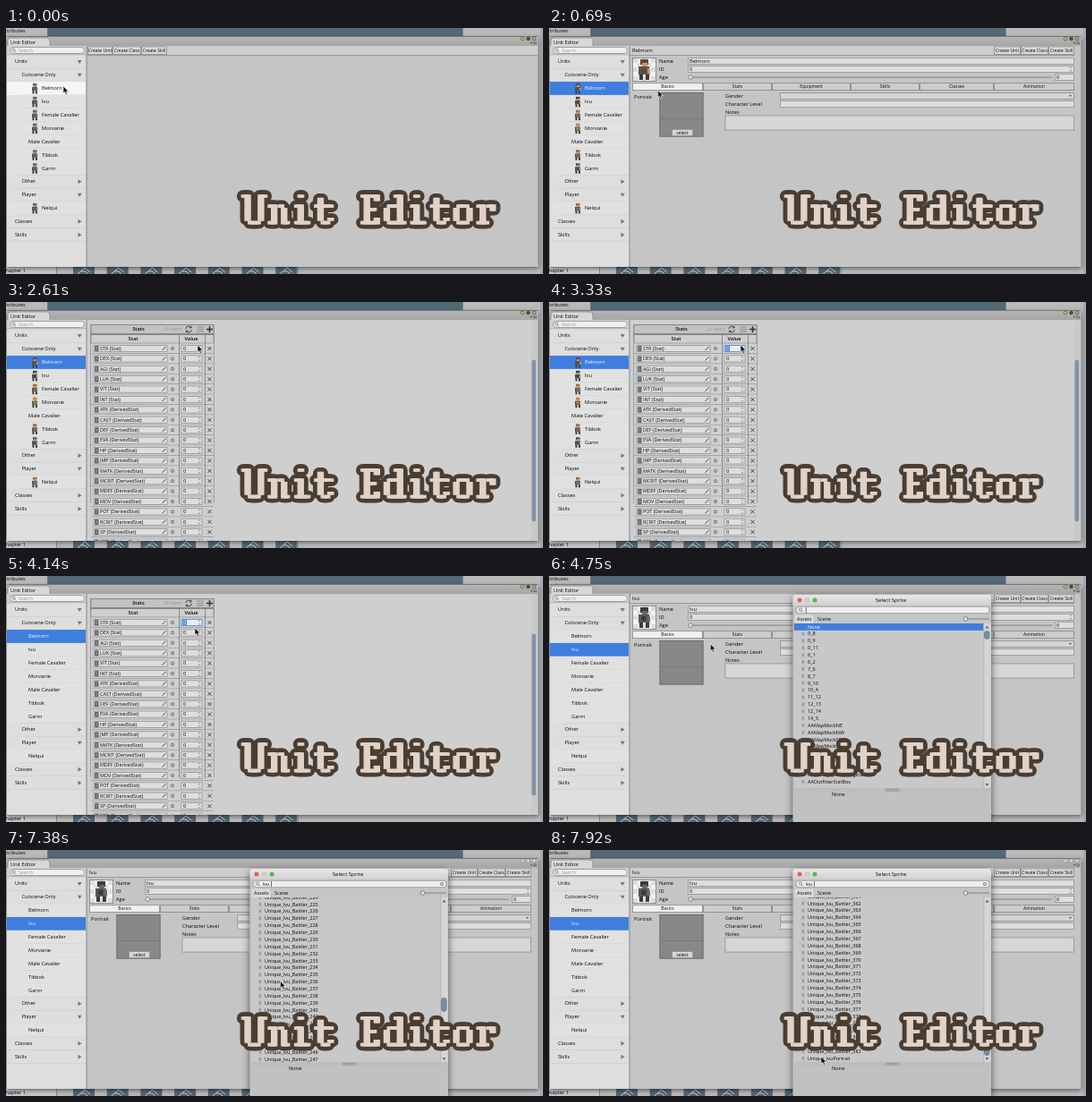
Animation of 600 by 275 pixels, one loop 8 s. Source, as an HTML page with a canvas:

```html
<!DOCTYPE html>
<html lang="en">
<head>
<meta charset="utf-8">
<title>Unit Editor</title>
<style>
  html, body { margin: 0; width: 100%; height: 100%; overflow: hidden; background: #b9b9b9; }
  canvas { display: block; width: 600px; height: 275px; }
</style>
</head>
<body>
<canvas id="stage" width="600" height="275"></canvas>
<script>
const ctx = document.getElementById('stage').getContext('2d');
const LOOP = 8000;
const FONT = '"Open Sans", "Lato", sans-serif';
const BLUE = '#3f7ede';
const INK = '#080808';
const ROW = 7.87;

// Bursts of steps: start, end, number of steps.
const bursts = [
  [0, 0, 1], [180, 860, 8], [1130, 1400, 4], [1580, 1980, 5], [2400, 2790, 5],
  [3060, 3330, 4], [3510, 3960, 6], [4140, 4840, 9], [4960, 4960, 1], [5140, 5140, 1],
  [5770, 5770, 1], [6670, 6670, 1], [7020, 7020, 1], [7200, 7920, 9]
];

const cursorKeys = [
  [0, 64, 65], [270, 64, 65], [860, 150, 72], [1130, 160, 71], [1400, 191, 65],
  [1980, 200, 72], [2400, 203, 70], [2595, 214, 48], [3330, 214, 48], [3510, 200, 51],
  [3960, 211, 58], [4140, 211, 58], [4315, 46, 80], [4400, 46, 80], [4577, 148, 116],
  [4665, 150, 114], [4752, 180, 76], [4960, 309, 37], [6670, 309, 37], [7020, 308, 90],
  [7920, 304, 231]
];

const units = [
  ['Units', 0, 'open'], ['Cutscene Only', 1, 'open'], ['Belmorn', 2, '#5b4a3c'], ['Ivu', 2, '#3c4046'],
  ['Female Cavalier', 2, '#a8653a'], ['Morvanie', 2, '#b98a50'], ['Male Cavalier', 2], ['Tibbok', 2, '#8a6a50'],
  ['Garrn', 2, '#4b4e55'], ['Other', 1, 'shut'], ['Player', 1, 'open'], ['Nelqui', 2, '#9a7048'],
  ['Classes', 0, 'shut'], ['Skills', 0, 'shut']
];
const stats = 'STR DEX AGI LUK VIT INT ATK CAST DEF EVA HP JMP MATK MCRIT MDEF MOV POT RCRIT SP SPD'.split(' ');
const sprites = ('None 0_8 0_9 0_11 6_1 6_2 7_6 8_7 9_10 10_4 11_12 12_13 12_14 14_5 AAMapMockNE AAMapMockNW ' +
  'AAMapMockSE AAMapMockSW AAMapMock AABoardStand AAMoneySymbol AAMoneySymbolOriginal AAOutfitterStatBox').split(' ');
const matches = ['None', 'Unique_Ivu_Ani1'];
for (let i = 0; i < 64; i++) matches.push('Unique_Ivu_Ani1_' + i);
for (let i = 0; i < 384; i++) matches.push('Unique_Ivu_Battler_' + i);
matches.push('Unique_IvuPortrait');

const clamp = v => Math.max(0, Math.min(1, v));
const ease = (t, from, to) => 1 - (1 - clamp((t - from) / (to - from))) ** 2;

function held(t) {
  const [from, to, n] = bursts.findLast(b => b[0] <= t);
  if (n === 1) return from;
  const gap = (to - from) / (n - 1);
  return from + gap * Math.min(n - 1, Math.floor((t - from + 8) / gap));
}

function cursorAt(t) {
  const next = cursorKeys.findIndex(k => k[0] > t);
  if (next < 0) return cursorKeys.at(-1).slice(1);
  const a = cursorKeys[next - 1], b = cursorKeys[next];
  const p = (t - a[0]) / (b[0] - a[0]);
  return [a[1] + (b[1] - a[1]) * p, a[2] + (b[2] - a[2]) * p];
}

function rect(x, y, w, h, fill, line) {
  if (fill) { ctx.fillStyle = fill; ctx.fillRect(x, y, w, h); }
  if (line) {
    ctx.strokeStyle = line;
    ctx.lineWidth = 0.8;
    ctx.strokeRect(x + 0.4, y + 0.4, w - 0.8, h - 0.8);
  }
}

function pill(x, y, w, h, r, fill, line) {
  ctx.beginPath();
  ctx.roundRect(x, y, w, h, r);
  ctx.fillStyle = fill;
  ctx.fill();
  if (line) { ctx.strokeStyle = line; ctx.lineWidth = 0.7; ctx.stroke(); }
}

function dot(x, y, r, fill, line) { pill(x - r, y - r, 2 * r, 2 * r, r, fill, line); }

function text(s, x, y, { size = 5.7, color = INK, align = 'left', weight = 500 } = {}) {
  ctx.font = `${weight} ${size}px ${FONT}`;
  ctx.fillStyle = color;
  ctx.textAlign = align;
  ctx.textBaseline = 'middle';
  ctx.fillText(s, x, y + 0.3);
}

function path(d, color, width = 0.8, fill) {
  const p = new Path2D(d);
  if (fill) { ctx.fillStyle = fill; ctx.fill(p); }
  if (color) { ctx.strokeStyle = color; ctx.lineWidth = width; ctx.stroke(p); }
}

function at(x, y, scale, draw) {
  ctx.save();
  ctx.translate(x, y);
  ctx.scale(scale, scale);
  draw();
  ctx.restore();
}

function clipped(x, y, w, h, draw) {
  ctx.save();
  ctx.beginPath();
  ctx.rect(x, y, w, h);
  ctx.clip();
  draw();
  ctx.restore();
}

function gradient(y, h, top, bottom) {
  const g = ctx.createLinearGradient(0, y, 0, y + h);
  g.addColorStop(0, top);
  g.addColorStop(1, bottom);
  return g;
}

function button(label, x, y, w, h, fill = '#d9d9d9', size = 5) {
  rect(x, y, w, h, fill, '#858585');
  text(label, x + w / 2, y + h / 2, { size, align: 'center' });
}

function figure(x, y, scale, tint, skin = '#c99873') {
  at(x, y, scale, () => {
    rect(-2, -6, 4.5, 3, tint);
    rect(-1, -4, 3, 2, skin);
    rect(-3, -2, 6, 4.5, '#55565a');
    rect(-1.5, -1, 2.5, 2.5, tint);
    rect(2, -1, 1.5, 3, skin);
    rect(-2.5, 2.5, 2, 3, '#3d3a38');
    rect(1, 2.5, 2, 3, '#3d3a38');
  });
}

function magnifier(x, y) {
  ctx.beginPath();
  ctx.arc(x, y, 1.6, 0, 7);
  ctx.moveTo(x + 1.2, y + 1.2);
  ctx.lineTo(x + 2.8, y + 2.8);
  ctx.strokeStyle = '#666';
  ctx.lineWidth = 0.7;
  ctx.stroke();
}

function drawBackdrop() {
  rect(0, 0, 600, 275, '#b9b9b9');
  rect(47, 0, 463, 9, '#536977');
  rect(46, 0, 1, 9, '#777');
  rect(510, 0, 1, 9, '#888');
  text('ttributes', -1, 3);
  rect(0, 267, 56, 8, '#c6c6c6');
  rect(56, 267, 1, 8, '#888');
  text('hapter 1', -0.5, 271.5);
  for (let i = 0; i < 7; i++) {
    const x = 75 + i * 37.7;
    rect(x, 266, 24, 9, '#526674');
    path(`M${x + 5} 275l8-7l6 5M${x + 9} 272q5 -1 7 3`, '#d2d8da', 1);
  }
  rect(326, 267, 1, 8, '#8e8e8e');
  rect(597, 0, 3, 275, '#a2a8ac');
}

function drawWindow(mainColor, focused) {
  ctx.save();
  ctx.shadowColor = '#0008';
  ctx.shadowBlur = 5;
  ctx.shadowOffsetY = 1.5;
  rect(1, 9, 593.5, 258, mainColor);
  ctx.restore();
  rect(1, 9, 593.5, 11, gradient(9, 11, '#b6b6b6', '#a5a5a5'));
  rect(1, 9, 593.5, 1, '#777');
  pill(2, 11, 47, 10, [3, 3, 0, 0], '#d8d8d8', '#808080');
  text('Unit Editor', 5, 16);
  ['#d8b849', '#494949', '#c8a556'].forEach((color, i) =>
    dot(577 + i * 6.5, 12, 2, focused ? color : '#dedede', focused ? '#555' : '#888'));
  path('M586 16h2l-1 1.5zM589 16h4M589 17.5h4', '#444', 0.6);
}

function drawSidebar(t, selected, icons) {
  rect(1, 20, 89, 10, '#d2d2d2');
  pill(4.5, 21.5, 83, 7, 3.5, '#efefef', '#858585');
  magnifier(8.5, 24.5);
  text('Search', 14, 25, { size: 5, color: '#999' });
  rect(1, 30, 89, 237, '#dedede');
  rect(1, 29.5, 89, 0.7, '#a5a5a5');
  units.forEach(([label, depth, mark], i) => {
    const y = 37.7 + i * 14.88;
    const chosen = label === selected;
    if (depth === 2) rect(1, y - 7.4, 88, 14.9, '#e1e1e1');
    if (chosen) rect(1, y - 7.4, 88, 14.9, BLUE);
    else if (!selected && i === 2) rect(1, y - 7.4, 88, 14.9, '#f5f5f5');
    if (!chosen) rect(1 + depth * 7, y + 7.2, 88 - depth * 7, 0.6, '#cbcbcb');
    const hasIcon = icons && depth === 2 && mark;
    if (hasIcon) figure(32, y + 0.5, 1, t < 180 ? '#66615b' : mark, t < 180 ? '#948a80' : undefined);
    text(label, hasIcon ? 40 : [10, 17.5, 25][depth], y, { color: chosen ? '#f5f8ff' : INK });
    if (mark === 'open') path(`M79.7 ${y - 1.8}h5l-2.5 4z`, null, 0, '#777');
    if (mark === 'shut') path(`M80.5 ${y - 2.4}v5l4-2.5z`, null, 0, '#777');
  });
  rect(89.5, 20, 1, 247, '#858585');
}

function drawHeader(name, tab) {
  rect(91, 20, 496, 10.5, '#cdcdcd');
  rect(91, 30, 496, 0.8, '#8d8d8d');
  text(name, 93, 25.3);
  button('Create Unit', 497, 20.5, 30, 9.5);
  button('Create Class', 527, 20.5, 31, 9.5);
  button('Create Skill', 558, 20.5, 29, 9.5);

  rect(93, 33, 27, 27, '#f4f4f4', '#777');
  for (let i = 0; i < 25; i += 2) rect(94 + i % 5 * 5, 34 + Math.floor(i / 5) * 5, 5, 5, '#dcdcdc');
  if (name === 'Ivu') figure(106, 47, 2, '#393a3c', '#6f675c');
  else figure(106, 47, 2, '#6a4632');

  ['Name', 'ID', 'Age'].forEach((label, i) => text(label, 123, 37.2 + i * 9));
  rect(155, 33.3, 432, 7.6, '#dedede', '#929292');
  rect(155, 42.2, 432, 7.6, '#dedede', '#929292');
  text(name, 157, 37.2);
  text('0', 157, 46.2);
  path('M582 45l1-1.5l1 1.5M582 47l1 1.5l1-1.5', '#777', 0.6);
  rect(156, 54.6, 406, 1, '#818181');
  dot(158.2, 55, 2.3, '#e5e5e5', '#666');
  rect(565, 51.2, 22, 7.6, '#dedede', '#929292');
  text('0', 567, 55.2);

  const edges = [93, 172, 249, 337, 414, 497, 587];
  ['Basics', 'Stats', 'Equipment', 'Skills', 'Classes', 'Animation'].forEach((label, i) =>
    button(label, edges[i], 61.3, edges[i + 1] - edges[i], 8.7, label === tab ? '#f0f0f0' : '#cdcdcd'));
}

function drawBasics(ready) {
  text('Portrait', 95, 77);
  rect(123.5, 72, 49, 49.5, '#888', '#666');
  rect(124.5, 101, 47, 0.8, '#757575');
  if (ready) button('select', 137, 113, 24, 8, '#d6d6d6');
  ['Gender', 'Character Level', 'Notes'].forEach((label, i) => text(label, 197, 76.3 + i * 8.8));
  rect(258, 72.3, 329, 7.6, '#d4d4d4', '#8d8d8d');
  path('M581 75h3l-1.5 2z', null, 0, '#555');
  rect(258, 81.2, 329, 7.6, '#dedede', '#929292');
  rect(196.5, 97.5, 390.5, 17, '#d6d6d6', '#8d8d8d');
}

function drawStats(filled, editing) {
  const bold = { align: 'center', weight: 600, size: 5.7 };
  rect(94.5, 77, 138, 200, '#c9c9c9', '#777');
  rect(94.5, 77, 138, 11, '#c3c3c3', '#777');
  text('Stats', 148, 82.6, bold);
  text('26 items', 176, 82.6, { size: 5.2, color: '#969696' });
  path('M201 82a3.2 3.2 0 0 1 6 -1.2v-2M207 80.8h-2M207.4 83a3.2 3.2 0 0 1 -6 1.2v2M201.4 84.2h2', '#333', 0.9);
  path('M213 80h8M213 82.5h8M213 85h8', '#8b8b8b', 1);
  path('M224 82.5h7M227.5 79v7', '#333', 1.5);
  rect(94.5, 88, 138, 10.5, '#cfcfcf', '#777');
  text('Stat', 142, 93.3, bold);
  text('Value', 207, 93.3, bold);
  stats.forEach((stat, i) => {
    const y = 98.4 + i * 11.4, mid = y + 5.6;
    rect(95, y, 137, 11.4, '#cfcfcf');
    rect(95, y + 10.8, 137, 0.8, '#8d8d8d');
    path(`M225.5 ${mid - 2}l4 4m0 -4l-4 4`, '#333', 0.9);
    if (!filled) return;
    rect(97.5, y + 1.6, 83, 8, '#dedede', '#929292');
    rect(99.3, mid - 2.7, 4, 5.6, '#788692', '#4d5960');
    text(stat + (i < 6 ? ' (Stat)' : ' (DerivedStat)'), 105, mid, { size: 5.4 });
    path(`M174.5 ${mid + 2}l4-4`, '#333', 0.9);
    dot(186, mid, 1.5, '#ddd', '#333');
    rect(195.5, y + 1.6, 24, 8, '#dedede', '#929292');
    const active = editing && i === 0;
    if (active) {
      rect(195.5, y + 1.6, 24, 8, '#e8eef8', '#4c7fd0');
      rect(197, y + 2.8, 5, 5.6, BLUE);
    }
    text('0', 198, mid, { color: active ? '#fff' : INK });
    path(`M215 ${mid - 1}l1-1.5l1 1.5M215 ${mid + 1}l1 1.5l1-1.5`, '#777', 0.6);
  });
  for (const x of [193, 222]) rect(x, 88, 0.8, 190, '#777');
}

function drawDialog(t) {
  const query = t < 5140 ? '' : t < 5770 ? 'i' : 'ivu ';
  const list = t < 5770 ? sprites : matches;
  const progress = ease(t, 7020, 7850);
  const offset = progress * Math.max(0, list.length * ROW - 184);

  ctx.save();
  ctx.shadowColor = '#0009';
  ctx.shadowBlur = 9;
  ctx.shadowOffsetY = 3;
  pill(272.5, 21, 221.5, 270, 3, '#c5c5c5');
  ctx.restore();
  pill(272.5, 21, 221.5, 12, [3, 3, 0, 0], gradient(21, 12, '#e8e8e8', '#d0d0d0'));
  dot(280, 27, 2.5, '#e45f55');
  dot(288.5, 27, 2.5, '#d2d2d0', '#bbb');
  dot(297, 27, 2.5, '#58b64e');
  text('Select Sprite', 382, 27.2, { size: 6, align: 'center' });

  pill(276, 34.2, 216, 7.5, 3.7, '#eee', '#888');
  magnifier(281, 37.5);
  text(query, 286.5, 38);
  rect(286.8 + ctx.measureText(query).width, 35, 0.7, 6, '#333');
  if (query) { dot(487, 38, 2.1, '#8a8a8a'); path('M486 37l2 2m0 -2l-2 2', '#eee', 0.6); }

  pill(274.5, 43.5, 21, 10, 1, '#d9d9d9');
  text('Assets', 277, 48.3, { size: 5.5 });
  text('Scene', 300, 48.3, { size: 5.5 });
  rect(463, 47.5, 29, 1, '#818181');
  dot(465.5, 48, 2.3, '#e5e5e5', '#666');

  rect(273.5, 53, 220, 184, '#c8c8c8');
  clipped(273.5, 53, 220, 184, () => {
    list.forEach((name, i) => {
      const y = 56.9 + i * ROW - offset;
      if (y < 45 || y > 245) return;
      if (i === 0) rect(273.5, y - ROW / 2, 212, ROW, BLUE);
      else {
        rect(282, y - 2.5, 4, 5, '#b4bcc1');
        rect(283, y - 1.5, 1.4, 2.5, '#7b8b97');
      }
      text(name, 289, y, { size: 5.45, color: i ? INK : '#f5f8ff' });
    });
  });
  rect(485.5, 53, 8, 184, '#d5d5d5');
  rect(485.5, 53, 0.7, 184, '#a5a5a5');
  const thumb = t < 5770 ? 9 : 15;
  pill(486.5, 61.5 + progress * (168 - thumb), 5.5, thumb, 2.7, '#778da5', '#5c6f84');
  path('M487.5 58.5l2-3l2 3zM487.5 232l2 3l2-3z', null, 0, '#666');

  rect(273.5, 237, 220, 4.5, '#bdbdbd');
  rect(273.5, 241, 220, 34, '#c1c1c1');
  path('M375.5 238.3h16M375.5 240.2h16', '#888', 0.8);
  text('None', 316, 244.2);
}

function drawCursor(t) {
  const [x, y] = cursorAt(t);
  ctx.save();
  ctx.translate(x, y);
  if (t >= 4960 && t < 7020) path('M-1.5 -3.5q1.5 0 1.5 1v5q0 1 -1.5 1M1.5 -3.5q-1.5 0 -1.5 1v5q0 1 1.5 1', '#222', 0.7);
  else path('M0 0v8l1.8-1.6l1.4 3l1.4-.6l-1.3-2.9h2.6z', '#fff', 0.6, '#111');
  ctx.restore();
}

// Lettering drawn with a square nib on a cell grid; the nib is two cells wide.
const strokes = {
  U: 'M0 0h1v7M2 8h2M5 7v-7h1',
  n: 'M0 3h1v5M0 8h1M3 3h.1M4 4v4h.8',
  i: 'M2 0h.1M1 3h1v5M1 8h3',
  t: 'M1 1v6M0 3h4M2 8h1M4 7h.1',
  E: 'M0 0h4v1M1 0v8M0 8h4v-1M2 4h1',
  d: 'M3 0h1v8M1 3h3M0 4v3M1 8h4',
  o: 'M1 3h2M0 4v3M4 4v3M1 8h2',
  r: 'M0 3h1v5M0 8h2M3 3h1v1'
};

function drawTitle() {
  const cell = 3.7;
  for (const [width, color, cap] of [[3.6, '#4a3d32', 'round'], [1, '#e0d2c8', 'square']]) {
    let column = 0;
    for (const letter of 'Unit Editor') {
      for (const nib of [0, 0.5, 1]) {
        at(264.5 + (column + nib) * cell, 188, cell, () => {
          ctx.lineCap = cap;
          ctx.lineJoin = cap === 'round' ? 'round' : 'miter';
          path(strokes[letter] || '', color, width);
        });
      }
      column += letter === 'U' ? 8 : 7;
    }
  }
}

function draw(t) {
  const selected = t < 180 ? null : t < 4395 ? 'Belmorn' : 'Ivu';
  const onStats = t >= 1400 && t < 4395;
  const scroll = onStats ? 52 * ease(t, 1580, 1980) : 0;

  drawBackdrop();
  drawWindow(onStats ? '#cfcfcf' : '#c5c5c5', t < 4840);
  clipped(91, 20, 503, 247, () => {
    if (!selected) {
      rect(91, 20, 503, 10, '#cdcdcd');
      rect(91, 30, 503, 0.8, '#8d8d8d');
      button('Create Unit', 91, 20.5, 28, 9.5);
      button('Create Class', 119, 20.5, 32, 9.5);
      button('Create Skill', 151, 20.5, 29, 9.5);
      return;
    }
    ctx.translate(0, -scroll);
    drawHeader(selected, onStats ? 'Stats' : 'Basics');
    if (onStats) drawStats(t > 1600, t >= 3060);
    else drawBasics(t < 4700 || t > 4800);
    ctx.translate(0, scroll);
    if (onStats && t > 1600) {
      rect(586.5, 20, 7.5, 247, '#c9c9c9');
      pill(587.5, 23 + scroll * 0.8, 4.5, 181, 2.2, '#7f94a9');
    }
  });
  drawSidebar(t, selected, t < 3510);
  if (t >= 4660) drawDialog(t);
  drawTitle();
  drawCursor(t);
}

function tick() {
  ctx.lineCap = 'butt';
  ctx.lineJoin = 'miter';
  draw(held(performance.now() % LOOP));
  requestAnimationFrame(tick);
}
tick();
</script>
</body>
</html>
```
